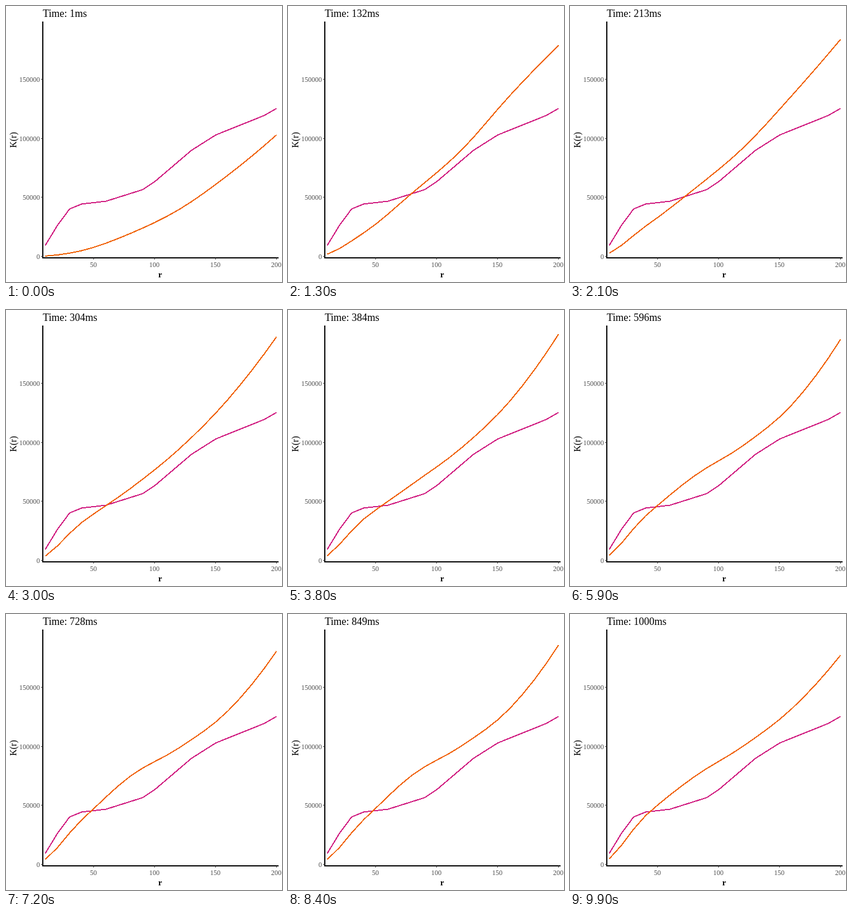
Animation, 480 px wide and 480 px high, one loop 10 s. Source, as an HTML page:

```html
<!DOCTYPE html>
<html lang="en">
<head>
<meta charset="utf-8">
<style>
html, body { margin: 0; width: 100%; height: 100%; overflow: hidden; background: #fff; }
svg { display: block; width: 480px; height: 480px; font: 12px "Liberation Serif", "Times New Roman", serif; }
path { fill: none; stroke-width: 2; stroke-linejoin: round; shape-rendering: crispEdges; }
#fixed, #moving { transform: translateX(.5px); }
#axes { stroke: #000; }
#ticks { stroke: #333; stroke-width: 1; }
#labels { fill: #4d4d4d; }
</style>
</head>
<body>
<svg viewBox="0 0 480 480">
  <path id="fixed" stroke="#d01c80"/>
  <path id="moving" stroke="#f06000"/>
  <path id="axes" d="M64 27V438M63 438H474"/>
  <path id="ticks"/>
  <g id="labels"></g>
  <text id="title" x="64" y="19" font-size="18"></text>
  <text x="268" y="472" font-size="15" font-weight="bold" text-anchor="middle">r</text>
  <text transform="translate(17.5 233) rotate(-90)" font-size="16" text-anchor="middle">K(r)</text>
</svg>
<script>
const FRAMES = 100, STEP = 100, GAP = 40;
const $ = id => document.getElementById(id);
const xOf = r => 46.6 + 2.117 * r;
const yOf = k => 435.5 - 2.052 * k;
const line = points => "M" + points.map(([r, k]) => `${xOf(r).toFixed(2)} ${yOf(k).toFixed(2)}`).join("L");

// Corners of the still curve: r, K in thousands
const still = [[10, 9.3], [20, 26.3], [30, 40.2], [40, 44.4], [60, 46.8], [90, 56.6],
  [100, 63.4], [130, 89.8], [150, 102.9], [190, 119.5], [200, 125.4]];

// Moving curve: frame, then K in thousands at r = 40, 80, ... 200
const poses = [
  [0, 4.9, 19.5, 39.8, 68.8, 103],
  [13, 20, 53.9, 89.8, 136.3, 179],
  [30, 32.2, 61, 94.4, 136.3, 189.5],
  [46, 38, 68.5, 95.9, 133.7, 193.9],
  [72, 37.8, 74.9, 98.8, 130, 180.7],
  [84, 38, 75.9, 100.2, 132.2, 185.9],
  [99, 41.5, 74.4, 100.2, 132, 177.3]
];

function poseAt(frame) {
  const n = Math.max(1, poses.findIndex(p => p[0] >= frame));
  const [t0, ...a] = poses[n - 1], [t1, ...b] = poses[n];
  return a.map((k, i) => k + (b[i] - k) * (frame - t0) / (t1 - t0));
}

// Catmull-Rom through the knots, mirrored at r = 0, parabolic past the end
function curve(knots) {
  const [c, d, e] = knots.slice(-3);
  const p = [knots[0], 0, ...knots, 3 * (e - d) + c];
  return Array.from({ length: 20 }, (_, j) => {
    const r = 10 * (j + 1), i = Math.min(4, Math.floor(r / GAP)), u = r / GAP - i;
    const [p0, p1, p2, p3] = p.slice(i, i + 4);
    const k = p1 + u / 2 * (p2 - p0 + u * (2 * p0 - 5 * p1 + 4 * p2 - p3 + u * (3 * (p1 - p2) + p3 - p0)));
    return [r, k];
  });
}

function label(text, x, y, anchor) {
  $("labels").innerHTML += `<text x="${x}" y="${y}" text-anchor="${anchor}">${text}</text>`;
}

let ticks = "";
for (let i = 0; i < 4; i++) {
  const r = 50 * (i + 1), x = Math.floor(xOf(r)), y = Math.floor(yOf(50 * i));
  ticks += `M61 ${y + 0.5}H64M${x + 0.5} 438V441`;
  label(50000 * i, 59, y + 5, "end");
  label(r, x, 454, "middle");
}
$("ticks").setAttribute("d", ticks);
$("fixed").setAttribute("d", line(still));

function draw() {
  const frame = Math.floor(performance.now() / STEP) % FRAMES;
  $("moving").setAttribute("d", line(curve(poseAt(frame))));
  $("title").textContent = `Time: ${Math.round(1 + frame * 999 / 99)}ms`;
  requestAnimationFrame(draw);
}
draw();
</script>
</body>
</html>
```
